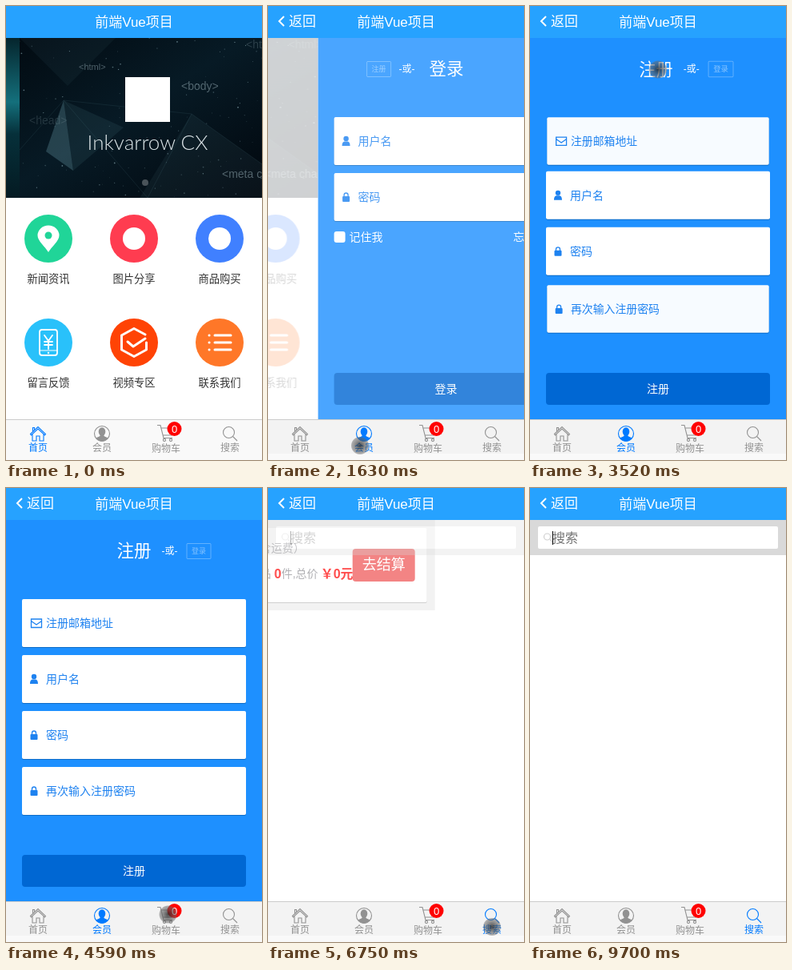
Animation of 320 by 568 pixels, one loop 9780 ms. Source, as an HTML page:

```html
<!DOCTYPE html>
<html lang="zh-CN">
<head>
<meta charset="utf-8">
<title>前端Vue项目</title>
<style>
html, body { margin: 0; width: 100%; height: 100%; overflow: hidden; background: #fff; }
svg { display: block; }
text { font-family: "Liberation Sans", "Noto Sans CJK SC", "Noto Sans CJK", sans-serif; font-size: 14px; dominant-baseline: central; }
.mid { text-anchor: middle; }
.white { fill: #fff; }
.line { fill: none; stroke: #fff; stroke-width: 3; stroke-linecap: round; stroke-linejoin: round; }
.menu text { font-size: 13.3px; text-anchor: middle; fill: #333; }
.tag { font-size: 9px; fill: #8fa5ad; opacity: .55; }
.tab { color: #929292; }
.tab.on { color: #007aff; }
.tab text { font-size: 12px; text-anchor: middle; fill: currentColor; }
.tab path, .tab circle { fill: none; stroke: currentColor; stroke-width: 1.1; }
.tab .solid { fill: currentColor; stroke: none; }
.field { fill: #1e82f0; }
.field .outline { fill: none; stroke: #1e82f0; stroke-width: 1.3; }
.sum { fill: #8f8f94; }
.red { fill: #f00; font-size: 16px; font-weight: bold; }
</style>
</head>
<body>
<svg width="320" height="568" viewBox="0 0 320 568">
  <defs>
    <linearGradient id="night" x2="1" y2="1">
      <stop stop-color="#020b12"/><stop offset=".45" stop-color="#071a25"/><stop offset="1" stop-color="#01060c"/>
    </linearGradient>
    <linearGradient id="teal" x2="0" y2="1">
      <stop stop-color="#05252d"/><stop offset=".4" stop-color="#14707c"/><stop offset=".6" stop-color="#06303a"/><stop offset="1" stop-color="#041a22"/>
    </linearGradient>
    <radialGradient id="touch">
      <stop stop-color="#222" stop-opacity=".8"/><stop offset=".6" stop-color="#555" stop-opacity=".6"/>
      <stop offset=".9" stop-color="#666" stop-opacity=".5"/><stop offset="1" stop-color="#666" stop-opacity="0"/>
    </radialGradient>
  </defs>

  <g id="home">
    <rect y="40" width="320" height="477" fill="#fff"/>
    <svg y="40" width="320" height="200">
      <g id="slides">
        <rect x="-320" width="320" height="200" fill="url(#teal)"/>
        <rect width="320" height="200" fill="url(#night)"/>
        <g fill="#6fa3b0">
          <path d="M33 142 55 78 67 166z" opacity=".3"/>
          <path d="M55 78 130 112 67 166z" opacity=".1"/>
          <path d="M150 200 215 95 320 170V200z" opacity=".07"/>
          <path d="M0 0H120L60 60z" opacity=".06"/>
        </g>
        <path d="M0 140 55 78 160 200 215 95 320 170M55 78 215 95" stroke="#7fb4c0" stroke-width=".5" fill="none" opacity=".2"/>
        <g id="stars" fill="#a9cdd6"></g>
        <g class="tag">
          <text x="74" y="36" style="font-size:11px">&lt;html&gt;</text>
          <text x="202" y="60">&lt;body&gt;</text>
          <text x="253" y="170">&lt;meta charset=</text>
          <text x="283" y="8" opacity=".5">&lt;html&gt;</text>
          <text x="12" y="103" opacity=".4">&lt;head&gt;</text>
        </g>
        <rect x="132" y="49" width="56" height="56" class="white"/>
        <text x="160" y="130" class="mid" fill="#dde5e8" style="font:300 26px Lato,sans-serif">Inkvarrow CX</text>
      </g>
      <circle id="dot" cy="181" r="4" class="white" opacity=".28"/>
    </svg>
    <g class="menu">
      <g transform="translate(53 291)">
        <circle r="30" fill="#20d598"/>
        <path class="white" d="M0 17C-4 10-13.5 3-13.5-4A13.5 12.5 0 0 1 13.5-4C13.5 3 4 10 0 17z"/>
        <circle cy="-4" r="4.5" fill="#20d598"/>
        <text y="50">新闻资讯</text>
      </g>
      <g transform="translate(160 291)">
        <circle r="30" fill="#ff3c50"/><circle r="14" class="white"/>
        <text y="50">图片分享</text>
      </g>
      <g transform="translate(267 291)">
        <circle r="30" fill="#4080ff"/><circle r="14" class="white"/>
        <text y="50">商品购买</text>
      </g>
      <g transform="translate(53 421)">
        <circle r="30" fill="#29c1fa"/>
        <rect x="-11" y="-16" width="22" height="32" rx="3" class="line" style="stroke-width:1.8"/>
        <path d="M-11 10H11" class="line" style="stroke-width:1.2"/>
        <path d="M-5-9 0-2 5-9M0-2V8M-5-1H5M-5 3H5" class="line" style="stroke-width:1.8"/>
        <circle cy="13" r="1.2" class="white"/>
        <text y="50">留言反馈</text>
      </g>
      <g transform="translate(160 421)">
        <circle r="30" fill="#ff4305"/>
        <path class="line" d="M14-10 0-17.5-15.5-9V9L0 17.5 15.5 9V0M-8-1-1 5 14-5"/>
        <text y="50">视频专区</text>
      </g>
      <g transform="translate(267 421)">
        <circle r="30" fill="#ff7728"/>
        <path class="line" d="M-13-9h.1M-6-9H14M-13 0h.1M-6 0H14M-13 9h.1M-6 9H14"/>
        <text y="50">联系我们</text>
      </g>
    </g>
  </g>

  <g id="member">
    <rect id="memberBg" y="40" height="477" fill="#1e90ff"/>
    <g id="labels"><text id="or" class="white mid" style="font-size:12px">-或-</text></g>
    <g id="form">
      <g id="loginExtras" class="white">
        <rect x="20" y="282" width="14" height="14" rx="3"/>
        <text x="39" y="289">记住我</text>
        <text x="300" y="289" text-anchor="end">忘记密码</text>
      </g>
      <rect id="submit" x="20" y="459" height="40" rx="4" fill="#0067d3"/>
      <text id="submitText" y="479" class="white mid"></text>
    </g>
  </g>

  <g id="cart">
    <rect id="cartBg" y="40" height="113" fill="#ededed"/>
    <rect id="cardShadow" x="10" y="51" height="93" rx="2" fill="#bbb"/>
    <rect id="card" x="10" y="50" height="93" rx="2" fill="#fff"/>
    <text x="25" y="75" class="sum">总计（不含运费）</text>
    <text x="25" y="107" class="sum">已勾选商品</text>
    <text x="99" y="107" class="red">0</text>
    <text x="108" y="107" class="sum">件,总价</text>
    <text x="157" y="107" class="red">￥0元</text>
    <g id="pay">
      <rect x="197" y="76" width="78" height="41" rx="4" fill="#ef4f4f"/>
      <text x="236" y="96" class="white mid" style="font-size:18px">去结算</text>
    </g>
  </g>

  <g id="search">
    <rect y="40" width="320" height="44" fill="#d9d9d9"/>
    <rect x="10" y="48" width="300" height="28" rx="2" class="white"/>
    <path d="M25 64.500l3 3M25.500 61a4 4 0 1 1-8 0a4 4 0 1 1 8 0" fill="none" stroke="#d0d0d0" stroke-width="1.200"/>
    <text x="28" y="62" fill="#757575" style="font-size:16px">搜索</text>
    <rect id="caret" x="28" y="54" width="1" height="17"/>
  </g>

  <rect width="320" height="40" fill="#26a2ff"/>
  <text x="160" y="20" class="white mid" style="font-size:17px">前端Vue项目</text>
  <g id="back">
    <path d="M20 13 14 19 20 25" class="line" style="stroke-width:2;stroke-linecap:butt;stroke-linejoin:miter"/>
    <text x="26" y="19.500" class="white" style="font-size:17px">返回</text>
  </g>

  <rect y="517" width="320" height="51" fill="#f9f9f9"/>
  <rect id="barShade" y="517" width="320" height="43" fill="#f3f3f3"/>
  <rect y="517" width="320" height="1" fill="#ccc"/>
  <g class="tab">
    <path d="M30.500 535.500 40 526.500 49.500 535.500 48.500 537 40 529 31.500 537zM33 536V544H38V538H42V544H47V536M33.500 532V527.500H35.500V530.500"/>
    <text x="40" y="553">首页</text>
  </g>
  <g class="tab">
    <circle cx="120" cy="535" r="9.500"/>
    <ellipse class="solid" cx="120" cy="532.500" rx="4.300" ry="5.200"/>
    <path class="solid" d="M112.500 541C114 538.500 118 539.500 118 536H122C122 539.500 126 538.500 127.500 541A9.500 9.500 0 0 1 112.500 541z"/>
    <text x="120" y="553">会员</text>
  </g>
  <g class="tab">
    <path d="M189 524.500H193L197 540.500H208M194 528H209L207 537H196.500"/>
    <circle cx="198" cy="543" r="1.600"/><circle cx="206" cy="543" r="1.600"/>
    <text x="200" y="554">购物车</text>
    <circle cx="210.500" cy="529" r="9" style="fill:#f00;stroke:none"/>
    <text x="210.500" y="529" style="fill:#fff;font-size:13px">0</text>
  </g>
  <g class="tab">
    <circle cx="278.500" cy="533.500" r="7"/><path d="M283.500 538.500 289 544"/>
    <text x="280" y="553">搜索</text>
  </g>
  <circle id="cursor" r="11.500" fill="url(#touch)"/>
</svg>

<script>
const LOOP = 9780;
const TO_MEMBER = 1259, TO_REGISTER = 3131, TO_CART = 5050, TO_SEARCH = 6648;
// The screen refreshes only at these moments.
const TICKS = [0, 150, 300, 450, 600, 750, 1210, 1360, 1510, 1660, 1810, 1960, 2150, 2300,
  2610, 2760, 2850, 3100, 3220, 3370, 3520, 3670, 3980, 4130, 4280, 4590, 5050, 5200, 5350, 5500, 5590,
  5990, 6140, 6290, 6750, 6900, 7050, 7200, 7350, 7660, 7810, 7960, 8110, 8730, 9040, 9190, 9700];
// Pointer strokes as [time, x, y]; the pointer is hidden between strokes.
const STROKES = [
  [[450, 120, 572], [750, 115, 550], [1810, 115, 550], [2150, 190, 555], [2290, 190, 555]],
  [[2610, 160, 79.5], [3700, 160, 79.5], [4130, 188, 514], [4270, 188, 514]],
  [[4590, 202.5, 533.5], [5840, 202.5, 533.5], [6290, 280, 549], [7340, 280, 549]],
  [[7810, 32, 550], [9030, 32, 550]]
];

const $ = id => document.getElementById(id);
const set = (el, attrs) => { for (const k in attrs) el.setAttribute(k, attrs[k]); };
function add(parent, tag, attrs, text) {
  const el = document.createElementNS('http://www.w3.org/2000/svg', tag);
  set(el, attrs);
  if (text) el.textContent = text;
  return parent.appendChild(el);
}
const mix = (a, b, k) => a + (b - a) * k;

// CSS "ease" over half a second
function ease(ms) {
  const x = ms / 500;
  if (x <= 0) return 0;
  if (x >= 1) return 1;
  let lo = 0, hi = 1, s;
  for (let i = 0; i < 24; i++) {
    s = (lo + hi) / 2;
    if (.75 * s * (1 - s) + s ** 3 < x) lo = s; else hi = s;
  }
  return .3 * s * (1 - s) ** 2 + 3 * s * s * (1 - s) + s ** 3;
}

let seed = 11;
const rnd = () => (seed = seed * 16807 % 2147483647) / 2147483647;
for (let i = 0; i < 130; i++)
  add($('stars'), 'circle', { cx: rnd() * 320, cy: rnd() * 200, r: .3 + rnd() * .6, opacity: .15 + rnd() * .5 });

const ICONS = {
  mail: '<path class="outline" d="M31.500 25H44.500V35.500H31.500zM31.500 27.500 38 32 44.500 27.500"/>',
  user: '<circle cx="35" cy="27" r="3.200"/><path d="M30 36C30 31 32 30 35 30.500 38 30 40 31 40 36z"/>',
  lock: '<rect x="30.500" y="29" width="9" height="7" rx="1"/><path class="outline" d="M32.500 30V27.500A2.500 2.500 0 0 1 37.500 27.500V30"/>'
};
const fields = [
  ['mail', '注册邮箱地址', 139, 139, true], ['lock', '再次输入注册密码', 349, 349, true],
  ['user', '用户名', 139, 209], ['lock', '密码', 209, 279]
].map(([icon, label, from, to, extra]) => {
  const g = add($('form'), 'g', { class: 'field' });
  const boxes = ['#0d6cc8', '#fff'].map((fill, i) => add(g, 'rect', { x: 20, y: 1 - i, height: 60, rx: 2, fill }));
  add(g, 'g', {}).innerHTML = ICONS[icon];
  add(g, 'text', { x: 50, y: 30 }, label);
  return { g, boxes, from, to, extra };
});

function makeLabel(word) {
  const box = add($('labels'), 'rect', { fill: 'none', stroke: '#fff', rx: 1 });
  const chars = [...word].map(c => add($('labels'), 'text', { class: 'white mid' }, c));
  return (cx, cy, big, stacked) => {
    const size = mix(9, 21.5, big), gap = stacked ? mix(7, 15, big) : size / 2;
    const w = stacked ? 25 : mix(30, 60, big), h = stacked ? 31 : mix(19, 36, big);
    set(box, { x: cx - w / 2, y: cy - h / 2, width: w, height: h, 'stroke-opacity': .3 * (1 - big) });
    chars.forEach((c, i) => {
      const d = i ? gap : -gap;
      set(c, { x: stacked ? cx : cx + d, y: stacked ? cy + d : cy, opacity: mix(.45, 1, big) });
      c.style.fontSize = size + 'px';
    });
  };
}
const registerLabel = makeLabel('注册'), loginLabel = makeLabel('登录');

const show = (id, on) => $(id).style.display = on ? '' : 'none';

// Slides a page in from the right and out to the left while fading.
function placePage(id, t, enter, leave, width, slides = true) {
  const shown = ease(t - enter), gone = ease(t - leave);
  const x = slides ? 320 * (1 - shown) - width * gone : 0;
  set($(id), { transform: `translate(${x})`, opacity: shown * (1 - gone) });
  show(id, t >= enter && gone < 1);
}

function drawMember(t) {
  const q = ease(t - TO_REGISTER), leaving = t >= TO_CART, width = leaving ? 248 : 320;
  placePage('member', t, TO_MEMBER, TO_CART, width);
  set($('memberBg'), { width });
  set($('submit'), { width: width - 40 });
  set($('submitText'), { x: width / 2 });
  $('submitText').textContent = t < TO_REGISTER ? '登录' : '注册';
  set($('loginExtras'), { opacity: 1 - q });
  // Once the page shrinks to its content, the heading wraps and pushes the form down.
  set($('form'), { transform: `translate(0 ${leaving ? 21 : 0})` });
  const y = leaving ? 90 : 79;
  registerLabel(leaving ? 120.5 : mix(76, 160, q), y, q, leaving);
  loginLabel(leaving ? 183.5 : mix(160.5, 241, q), y, 1 - q, leaving);
  set($('or'), { x: leaving ? 158.5 : mix(111, 204.5, q), y });
  for (const { g, boxes, from, to, extra } of fields) {
    boxes.forEach(b => set(b, { width: width - 40 }));
    const scale = extra ? mix(.7, 1, q) : 1, mid = width / 2;
    set(g, {
      transform: `translate(${mid} ${mix(from, to, q) + 30}) scale(${scale}) translate(${-mid} -30)`,
      opacity: extra ? q : 1
    });
  }
}

function drawCart(t) {
  const width = t >= TO_SEARCH ? 300 : 320;
  placePage('cart', t, TO_CART, TO_SEARCH, width);
  set($('cartBg'), { width });
  set($('card'), { width: width - 20 });
  set($('cardShadow'), { width: width - 20 });
  set($('pay'), { transform: `translate(${width - 300})` });
}

function drawCursor(t) {
  const stroke = STROKES.find(s => t >= s[0][0] && t < s[s.length - 1][0]);
  show('cursor', stroke);
  if (!stroke) return;
  const i = stroke.findIndex(p => p[0] > t), [t0, x0, y0] = stroke[i - 1], [t1, x1, y1] = stroke[i];
  const k = (t - t0) / (t1 - t0);
  set($('cursor'), { cx: mix(x0, x1, k), cy: mix(y0, y1, k) });
}

function draw(t) {
  placePage('home', t, -1000, TO_MEMBER, 320);
  set($('slides'), { transform: `translate(${17 * Math.max(0, 1 - t / 250) ** 2})` });
  set($('dot'), { cx: t < 250 ? 174 : 146 });
  drawMember(t);
  drawCart(t);
  placePage('search', t, TO_SEARCH, Infinity, 320, false);
  show('caret', t >= TO_SEARCH && (t - 6630) % 1020 < 455);

  const away = t >= 1210;
  show('back', away);
  show('barShade', away);
  const active = away + (t >= TO_CART) + (t >= TO_SEARCH);
  document.querySelectorAll('.tab').forEach((tab, i) => tab.classList.toggle('on', i === active));
  drawCursor(t);
}

const start = performance.now();
function tick() {
  const t = (performance.now() - start) % LOOP;
  draw(TICKS.filter(s => s <= t).pop() || 0);
  requestAnimationFrame(tick);
}
tick();
</script>
</body>
</html>
```
